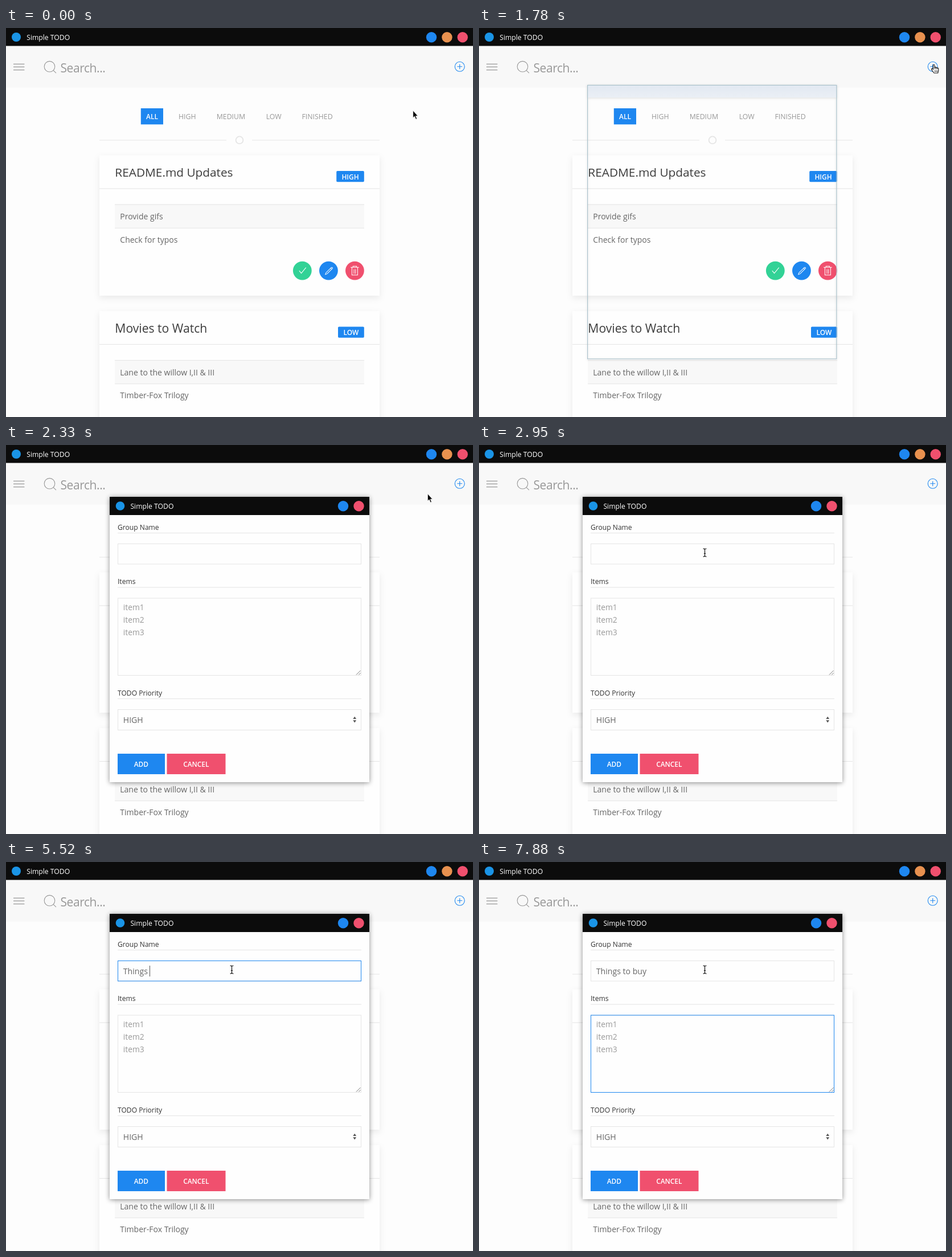
These frames come from a looping animation (820 by 683 pixels, 8000 ms). An HTML page:

```html
<!DOCTYPE html>
<html lang="en">
<head>
<meta charset="utf-8">
<title>Simple TODO</title>
<style>
  html, body { margin: 0; width: 100%; height: 100%; overflow: hidden; background: #fdfdfd; }
  svg { display: block; }
  text { font-family: "Open Sans", "Noto Sans", sans-serif; white-space: pre; }
  .card { filter: drop-shadow(0 4px 6px rgba(0, 0, 0, .08)); }
  .panel { filter: drop-shadow(0 1px 4px rgba(0, 0, 0, .45)); }
  .ghost { filter: drop-shadow(0 1px 2px rgba(0, 0, 0, .15)); }
</style>
</head>
<body>
<svg id="stage" width="820" height="683" viewBox="0 0 820 683"></svg>
<script>
const BLUE = '#1e87f0', RED = '#f0506e', GREEN = '#32d296', ORANGE = '#e8914f';
const LOGO = '#1a94e6', BAR = '#0c0c0c', LINE = '#e5e5e5', GREY = '#999', BODY = '#666', DARK = '#333';
const LOOP = 8000;

// Drawing helpers
const text = (x, y, str, size, fill, extra = '') =>
  `<text x="${x}" y="${y}" font-size="${size}" fill="${fill}" ${extra}>${str}</text>`;
const rect = (x, y, w, h, fill, extra = '') =>
  `<rect x="${x}" y="${y}" width="${w}" height="${h}" fill="${fill}" ${extra}/>`;
const box = (x, y, w, h, stroke, extra = '') =>
  rect(x + .5, y + .5, w - 1, h - 1, 'none', `stroke="${stroke}" ${extra}`);
const dot = (x, y, r, fill) => `<circle cx="${x}" cy="${y}" r="${r}" fill="${fill}"/>`;
const ring = (x, y, r, stroke, w) =>
  `<circle cx="${x}" cy="${y}" r="${r}" fill="none" stroke="${stroke}" stroke-width="${w}"/>`;
const path = (d, stroke, w, extra = '') =>
  `<path d="${d}" fill="none" stroke="${stroke}" stroke-width="${w}" ${extra}/>`;
const label = (x, y, str) => text(x, y, str, 11.9, '#fff', 'font-weight="600" text-anchor="middle"');

function iconButton(x, fill, d) {
  return dot(x, 426.1, 16.4, fill) +
    path(d, '#fff', 1.1, `transform="translate(${x - 9.1} 417) scale(.911)"`);
}

function card(top, title, size, priority, badgeWidth, rows) {
  const rowTop = top + 86;
  return rect(164, top, 492, 246.5, '#fefefe', 'class="card"') +
    text(191.3, top + 37.6, title, size, '#3c3c3c') +
    rect(628.8 - badgeWidth, top + 27.4, badgeWidth, 19.4, BLUE, 'rx="1.8"') +
    label(628.8 - badgeWidth / 2, top + 42.2, priority) +
    rect(164, top + 58, 492, 1, LINE) +
    rect(191, rowTop, 438, 42, '#f8f8f8') +
    rect(191, rowTop, 438, 1, LINE) + rect(191, rowTop + 41.3, 438, 1, LINE) +
    text(200.3, rowTop + 26.6, rows[0], 14, BODY) +
    text(200.3, rowTop + 67.4, rows[1], 14, BODY);
}

function page() {
  const tabs = [[303, 'HIGH'], [369.7, 'MEDIUM'], [456.7, 'LOW'], [519.5, 'FINISHED']];
  return rect(0, 0, 820, 683, '#fdfdfd') +
    rect(0, 31, 820, 73.5, '#f8f8f8') + rect(0, 0, 820, 31.5, BAR) +
    dot(18, 16, 8, LOGO) + text(36.2, 21, 'Simple TODO', 12.2, '#fff') +
    dot(747, 16.3, 9.2, BLUE) + dot(774.4, 16.3, 9.2, ORANGE) + dot(801.7, 16.3, 9.2, RED) +
    path('M13 63.3h19.4M13 68.4h19.4M13 73.6h19.4', GREY, 1.2) +
    ring(76.5, 67.7, 9.3, GREY, 1.1) + path('M83 74.3L88 79.2', GREY, 1.1) +
    text(95.5, 77.5, 'Search...', 21, GREY, 'letter-spacing="-.42"') +
    ring(796.7, 67.8, 8.5, BLUE, 1.1) + path('M792.3 67.8h8.8M796.7 63.4v8.8', BLUE, 1.1) +
    rect(236.8, 141, 39.2, 28.3, BLUE) + label(256.5, 160, 'ALL') +
    tabs.map(([x, s]) => text(x, 160, s, 12.3, GREY)).join('') +
    rect(164, 196.5, 223, 1, LINE) + rect(432, 196.5, 224, 1, LINE) +
    ring(410, 196.8, 6.4, LINE, 1.8) +
    card(223.5, 'README.md Updates', 20.8, 'HIGH', 48.6, ['Provide gifs', 'Check for typos']) +
    iconButton(520.3, GREEN, 'M4 10L8 15L17 4') +
    iconButton(566.4, BLUE, 'M17.25 6L7.1 16.1L3.8 17.2L5 13.9L15.1 3.9C15.7 3.3 16.7 3.3 17.25 3.9C17.8 4.5 17.8 5.4 17.25 6ZM16 7.3L13.85 5.15') +
    iconButton(612.4, RED, 'M6.5 3V1.5H13.5V3M4.5 4V18.5H15.5V4M8.5 7V16M11.5 7V16M2 3.5H18') +
    card(497, 'Movies to Watch', 21.15, 'LOW', 45.8,
      ['Lane to the willow I,II &amp; III', 'Timber-Fox Trilogy']);
}

function form() {
  const heads = [[148.5, 'Group Name', 154], [244.3, 'Items', 249.5], [440, 'TODO Priority', 445]];
  return rect(182, 91, 456, 32, BAR) + dot(200.5, 107, 7.8, LOGO) +
    text(218.4, 112, 'Simple TODO', 12.2, '#fff') +
    dot(592, 107.3, 9.2, BLUE) + dot(619.5, 107.3, 9.2, RED) +
    heads.map(([y, s, line]) => text(196, y, s, 12.1, DARK) + rect(196, line, 428, 1, LINE)).join('') +
    box(196, 173, 428, 36.5, LINE) + box(196, 268.5, 428, 136.5, LINE) + box(196, 464, 428, 37, LINE) +
    box(196, 173, 428, 36.5, BLUE, 'id="nameFocus"') +
    box(196, 268.5, 428, 136.5, BLUE, 'id="itemsFocus"') +
    [1, 2, 3].map(i => text(205.8, 268.2 + 21.9 * i, 'item' + i, 13.8, GREY)).join('') +
    path('M615 403.5L622.5 396M619.3 403.5L622.5 400.3', '#777', 1) +
    text(205.8, 488.2, 'HIGH', 14, BODY) +
    '<path d="M609.3 481L612.2 476.8L615.1 481ZM609.3 483.3L612.2 487.5L615.1 483.3Z" fill="#555"/>' +
    rect(196, 542, 83, 36, BLUE) + label(237.3, 564.5, 'ADD') +
    rect(282.5, 542, 103, 36, RED) + label(333.8, 564.5, 'CANCEL') +
    text(205.8, 197.4, '', 14.1, BODY, 'id="typed"') +
    rect(206, 182, 1, 19, '#555', 'id="caret"');
}

const ghost = '<g id="ghost" class="ghost">' +
  '<linearGradient id="glass" x2="0" y2="1"><stop stop-color="#e2eaf4"/><stop offset="1" stop-color="#ecf1f8"/></linearGradient>' +
  rect(182, 91, 456, 23, 'url(#glass)', 'opacity=".9"') +
  box(182, 91, 456, 501, '#a9c0ca', 'stroke-width="1.2"') + '</g>';
const pointers =
  '<path id="arrow" d="M0 0V12.6L2.8 10L4.9 15.2L6.9 14.4L4.8 9.4H8.4Z" fill="#000" stroke="#fff" stroke-width=".7"/>' +
  '<g id="hand" stroke="#111" stroke-width="1.1" stroke-linejoin="round">' +
  '<path fill="#fff" d="M-1.3 8.5V1a1.3 1.3 0 0 1 2.6 0V5.2a1.2 1.2 0 0 1 2.4 .3a1.2 1.2 0 0 1 2.3 .4a1.2 1.2 0 0 1 2 .8V10.5L7 14.5H.3L-3 10.3Q-5.2 7.2 -3.6 6.8Q-2.5 6.6 -1.3 8.5Z"/>' +
  '<path d="M1.3 5V8M3.7 5.5V8M6 6V8M1.7 10V12.5M3.7 10V12.5M5.7 10V12.5" stroke-width=".9"/></g>' +
  path('M-3 -7Q0 -7 0 -5.5Q0 -7 3 -7M0 -6V6M-3 7Q0 7 0 5.5Q0 7 3 7M-1.6 1.5H1.6', '#111', 1.2, 'id="beam"');

document.getElementById('stage').innerHTML = page() + ghost +
  '<g id="panel">' + rect(182, 91, 456, 501, '#fefefe', 'class="panel"') + '</g>' +
  '<g id="form">' + form() + '</g><g id="pointer">' + pointers + '</g>';

const el = {};
for (const node of document.querySelectorAll('[id]')) el[node.id] = node;

// [start, scale, outline opacity, panel opacity]
const opening = [[0, 1, 0, 0], [1710, .95, .4, 0], [1780, .961, 1, 0], [1860, .982, .6, .5],
  [1950, .994, 0, .88], [2020, 1, 0, 1]];
// [start, typed length]
const typing = [[0, 0], [3980, 1], [4210, 2], [4360, 3], [4510, 5], [5370, 6], [5520, 7], [5830, 8],
  [5910, 9], [5990, 10], [6160, 11], [6310, 12], [6460, 13]];
const nameFocus = [[0, 0], [3030, .6], [3110, 1], [6860, .65], [6940, .3], [7020, 0]];
const itemsFocus = [[0, 0], [6860, .35], [6940, .7], [7020, 1]];
const caretOn = [[0, 0], [3030, 1], [3500, 0], [3980, 1], [5060, 0], [5370, 1], [6860, 2], [7330, 0]];

const at = (table, t) => table.reduce((found, row) => row[0] <= t ? row : found);
const clamp = v => Math.max(0, Math.min(1, v));
const show = (node, on) => node.setAttribute('visibility', on ? 'visible' : 'hidden');

function pointerAt(t) {
  if (t < 700) {
    const k = clamp(Math.floor((t - 140) / 78 + 1.02) / 6), e = k * k * (3 - 2 * k);
    return ['arrow', 714.7 + 82 * e, 145 - 80 * e];
  }
  const k = clamp(Math.floor((t - 2175) / 77) / 10);
  const x = 798.7 - 402.2 * k ** 1.2, y = 64.5 + 124.5 * k ** 1.1;
  return [k === 0 ? 'hand' : y > 173 ? 'beam' : 'arrow', x, y];
}

function draw(t) {
  const [, scale, outline, fill] = at(opening, t);
  // Grows about the panel's centre, snapped down to whole pixels
  const zoom = scale === 1 ? '' : `translate(409.2 340.7) scale(${scale}) translate(-410 -341.5)`;
  el.ghost.setAttribute('transform', zoom);
  el.ghost.setAttribute('opacity', outline);
  el.panel.setAttribute('transform', zoom);
  el.panel.setAttribute('opacity', fill);
  const open = t >= 2180;
  el.form.setAttribute('display', open ? 'inline' : 'none');
  if (open) {
    el.typed.textContent = 'Things to buy'.slice(0, at(typing, t)[1]);
    el.nameFocus.setAttribute('opacity', at(nameFocus, t)[1]);
    el.itemsFocus.setAttribute('opacity', at(itemsFocus, t)[1]);
  }
  const caret = open ? at(caretOn, t)[1] : 0;
  show(el.caret, caret);
  if (caret) {
    el.caret.setAttribute('x', caret === 2 ? 206 : Math.floor(206 + el.typed.getComputedTextLength()));
    el.caret.setAttribute('y', caret === 2 ? 275 : 182);
  }
  const [kind, x, y] = pointerAt(t);
  for (const id of ['arrow', 'hand', 'beam']) show(el[id], id === kind);
  el.pointer.setAttribute('transform', `translate(${x} ${y})`);
}

const start = performance.now();
function frame() {
  draw((performance.now() - start) % LOOP);
  requestAnimationFrame(frame);
}
frame();
</script>
</body>
</html>
```
